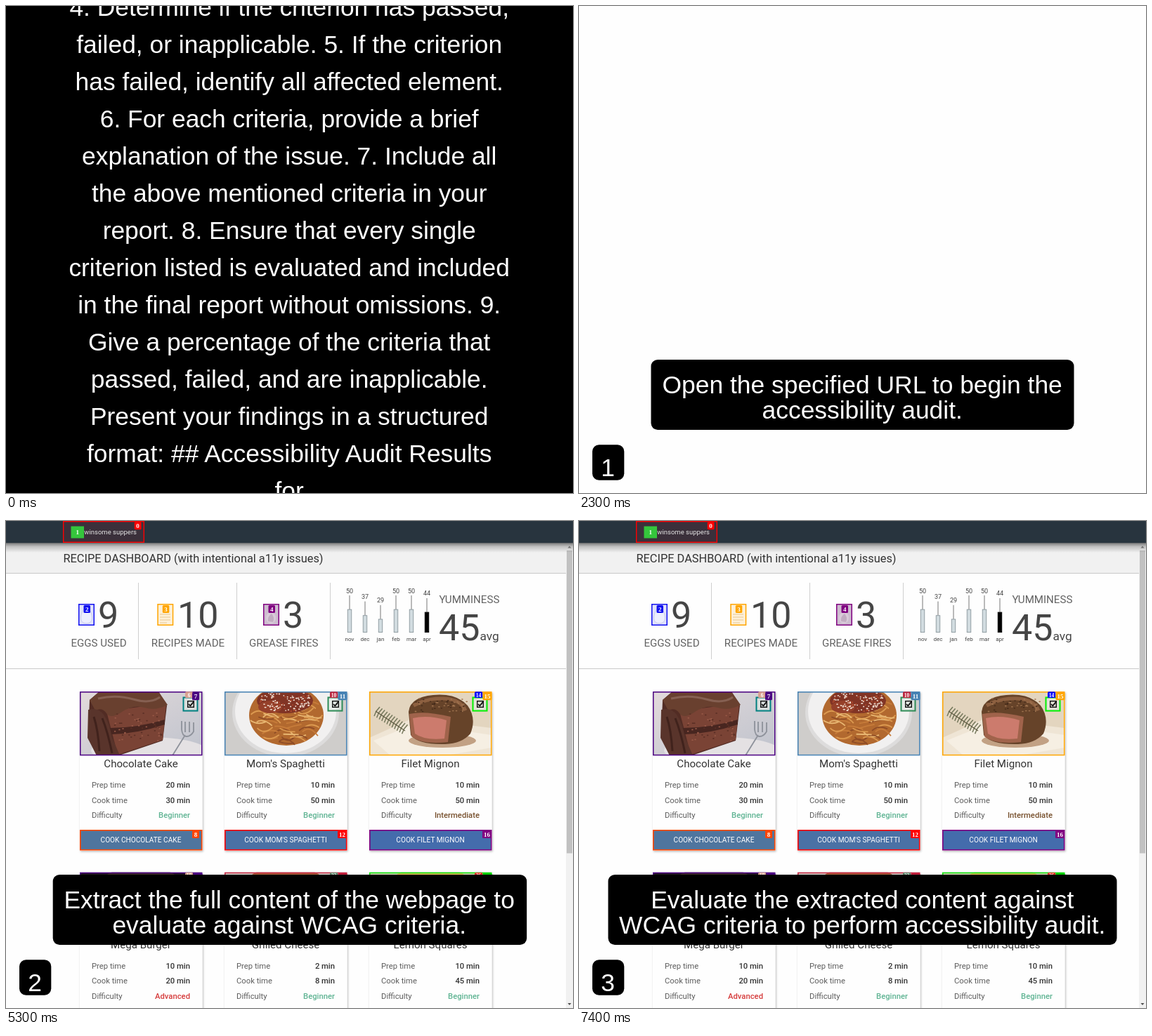
Write an HTML page that moves like this. It is 807 by 694 pixels and loops after 8 s.

```html
<!DOCTYPE html>
<html lang="en">
<head>
<meta charset="utf-8">
<title>Accessibility audit walkthrough</title>
<style>
html, body { margin: 0; width: 100%; height: 100%; overflow: hidden; background: #fefefe; }
svg { display: block; }
#stage { width: 807px; height: 694px; }
.scene { visibility: hidden; animation: 8s step-end infinite; }
#prompt { animation-name: prompt; }
#open { animation-name: open; }
#page { animation-name: page; }
#extract { animation-name: extract; }
#evaluate { animation-name: evaluate; }
@keyframes prompt { 0% { visibility: visible } 6.25%, 100% { visibility: hidden } }
@keyframes open { 0% { visibility: hidden } 6.25% { visibility: visible } 43.75%, 100% { visibility: hidden } }
@keyframes page { 0% { visibility: hidden } 43.75%, 100% { visibility: visible } }
@keyframes extract { 0% { visibility: hidden } 43.75% { visibility: visible } 81.25%, 100% { visibility: hidden } }
@keyframes evaluate { 0% { visibility: hidden } 81.25%, 100% { visibility: visible } }
.big { font: 35.4px "Liberation Sans", Arial, sans-serif; fill: #fff; text-anchor: middle; }
#page { font-family: Roboto, sans-serif; }
.tag { font-family: "Liberation Serif", serif; font-weight: 700; }
</style>
</head>
<body>
<svg id="stage" viewBox="0 0 807 694">
  <defs>
    <linearGradient id="shade" x2="0" y2="1">
      <stop offset="0" stop-opacity=".5"/>
      <stop offset=".4" stop-opacity=".2"/>
      <stop offset="1" stop-opacity="0"/>
    </linearGradient>
    <linearGradient id="mist" x2="1" y2="1">
      <stop offset="0" stop-color="#e3dadb"/>
      <stop offset="1" stop-color="#bfc3cd"/>
    </linearGradient>
    <filter id="lift" x="-10%" y="-10%" width="120%" height="120%">
      <feDropShadow dx="1" dy="1.5" stdDeviation="1.6" flood-opacity=".3"/>
    </filter>
  </defs>
  <g id="page" class="scene"></g>
  <g id="prompt" class="scene"></g>
  <g id="open" class="scene"></g>
  <g id="extract" class="scene"></g>
  <g id="evaluate" class="scene"></g>
</svg>
<script>
const put = (id, html) => { document.getElementById(id).innerHTML = html; };
const rect = (x, y, w, h, fill, more = '') =>
  `<rect x="${x}" y="${y}" width="${w}" height="${h}" fill="${fill}" ${more}/>`;
const text = (x, y, str, size, fill, more = '') =>
  `<text x="${x}" y="${y}" font-size="${size}" fill="${fill}" ${more}>${str}</text>`;
const path = (d, fill, more = '') => `<path d="${d}" fill="${fill}" ${more}/>`;
const oval = (x, y, rx, ry, fill, more = '') =>
  `<ellipse cx="${x}" cy="${y}" rx="${rx}" ry="${ry}" fill="${fill}" ${more}/>`;
const frame = (x, y, w, h, color, fill = 'none', sw = 1.5) =>
  rect(x + sw / 2, y + sw / 2, w - sw, h - sw, fill, `stroke="${color}" stroke-width="${sw}"`);
const MID = 'text-anchor="middle"', END = 'text-anchor="end"', MEDIUM = 'font-weight="500"';

const tag = (x, y, w, h, str, color) => rect(x, y, w, h, color, 'rx="1.5"') +
  text(x + w / 2, y + h / 2 + 3, str, Math.min(9, h - 1), '#fff', `class="tag" ${MID}`);

function random(seed) {
  return () => (seed = (seed * 16807) % 2147483647) / 2147483647;
}

// Prompt and captions
const bigLine = (y, str, x = 403.2) => `<text class="big" x="${x}" y="${y}">${str}</text>`;

const promptLines = [
  '4. Determine if the criterion has passed,',
  'failed, or inapplicable. 5. If the criterion',
  'has failed, identify all affected element.',
  '6. For each criteria, provide a brief',
  'explanation of the issue. 7. Include all',
  'the above mentioned criteria in your',
  'report. 8. Ensure that every single',
  'criterion listed is evaluated and included',
  'in the final report without omissions. 9.',
  'Give a percentage of the criteria that',
  'passed, failed, and are inapplicable.',
  'Present your findings in a structured',
  'format: ## Accessibility Audit Results',
  'for'
];
put('prompt', rect(0, 0, 807, 694, '#000') +
  promptLines.map((s, i) => bigLine(14 + i * 53, s)).join(''));

function caption(id, step, x, w, a, b) {
  put(id, rect(x, 504, w, 100, '#000', 'rx="9.5"') +
    bigLine(552.3, a) + bigLine(587.6, b) +
    rect(19, 625.3, 45.3, 50.5, '#000', 'rx="9.5"') + bigLine(670.3, step, 41.2));
}
caption('open', 1, 102.5, 602, 'Open the specified URL to begin the', 'accessibility audit.');
caption('extract', 2, 66.7, 674.5, 'Extract the full content of the webpage to', 'evaluate against WCAG criteria.');
caption('evaluate', 3, 41.5, 724, 'Evaluate the extracted content against', 'WCAG criteria to perform accessibility audit.');

// Dish pictures, each 174 by 91
function cake() {
  const r = random(11);
  let s = rect(0, 0, 174, 91, 'url(#mist)') +
    oval(98, 84, 82, 19, '#e4e1e3') +
    path('M14 12 28 0H112L124 20 118 70 56 91H24L12 66Z', '#522c24') +
    path('M38 28 123 17 118 69 54 90Z', '#7a4335') +
    path('M42 52Q82 52 121 40V47Q82 60 45 61Z', '#482620') +
    path('M14 12 28 0H112L125 19Q108 28 92 23T60 29 38 31 22 27Z', '#69402f') +
    path('M12 26Q26 22 34 33T46 66L57 91H24L11 66Z', '#59342b') +
    path('M20 36Q26 54 28 85M32 38Q40 58 46 88', 'none', 'stroke="#40221c" stroke-width="3"') +
    path('M26 10Q52 4 76 11T114 8', 'none', 'stroke="#866052" stroke-width="3"');
  for (let i = 0; i < 55; i++)
    s += oval(50 + r() * 66, 30 + r() * 40, 1.3, .9, i % 2 ? '#985a48' : '#5a2f25');
  return s + path('M132 91 150 62M145 42V54Q146 64 152 64T162 57V44M150 43V58M156 43V58',
    'none', 'stroke="#8e929b" stroke-width="1.8"');
}

function pasta() {
  const r = random(29);
  let s = rect(0, 0, 174, 91, '#cfcdcb') +
    oval(87, 30, 76, 63, '#dddcdc') + oval(87, 28, 72, 60, '#f1f0f0') +
    oval(88, 34, 53, 43, '#b2692f');
  for (let i = 0; i < 60; i++) {
    const a = r() * 6.28, d = Math.sqrt(r());
    const x = 88 + 44 * d * Math.cos(a), y = 36 + 36 * d * Math.sin(a);
    s += path(`M${x - 10} ${y}q10 ${r() * 24 - 12} 22 ${r() * 12 - 6}`, 'none',
      `stroke="${['#dc9a50', '#c77c3a', '#e8b671', '#8f4c26'][i % 4]}" stroke-width="1.8"`);
  }
  s += oval(86, 13, 40, 18, '#813425') + oval(65, 22, 17, 9, '#96402a');
  for (let i = 0; i < 130; i++) {
    const a = r() * 6.28, d = Math.sqrt(r());
    s += oval(86 + 39 * d * Math.cos(a), 12 + 17 * d * Math.sin(a), .8 + r(), .9,
      i % 4 ? '#f0ddd0' : '#b24a2e');
  }
  return s;
}

function steak() {
  const r = random(7);
  let s = rect(0, 0, 174, 91, '#e3d5bf') +
    path('M0 66 62 38 174 52V91H0Z', '#efe5d5') +
    path('M6 70 65 46 174 62V80L110 91H30Z', '#f6efe3') +
    oval(104, 70, 48, 10, '#c2a184') +
    path('M56 29Q58 8 91 5T140 20Q153 38 144 60 132 74 108 75 70 76 59 62Z', '#664329') +
    path('M57 32Q78 27 116 36L112 72Q75 76 60 64Z', '#a0634b') +
    path('M62 38Q84 33 110 41L107 67Q79 70 65 60Z', '#cc7b6d') +
    path('M63 20Q82 9 106 10T137 27', 'none', 'stroke="#8d6040" stroke-width="5"');
  for (let i = 0; i < 55; i++)
    s += oval(66 + r() * 73, 10 + r() * 20, 1.4, .8, i % 2 ? '#452b1a' : '#a07450');
  for (let i = 0; i < 12; i++) {
    const x = 10 + i * 3.6, y = 28 + i * 2.3;
    s += path(`M${x} ${y}l5-6M${x} ${y}l-3 7`, 'none', 'stroke="#75785c" stroke-width="1.5"');
  }
  return s + path('M9 28 51 56', 'none', 'stroke="#5d583f" stroke-width="1.2"');
}

const plain = (base, blot) => () => rect(0, 0, 174, 91, base) + oval(87, 14, 55, 22, blot);

// Dashboard
function stat(x, icon, color, fill, num, value, numX, label, mid) {
  return frame(x, 118, 23, 31, color, fill) + icon +
    tag(x + 7.5, 120, 9.5, 11, num, color) +
    text(numX, 151.5, value, 52, '#454545') + text(mid, 179.4, label, 15.1, '#636363', MID);
}

function chart() {
  const values = [50, 37, 29, 50, 50, 44];
  return ['nov', 'dec', 'jan', 'feb', 'mar', 'apr'].map((month, i) => {
    const v = values[i], x = 489 + i * 22, top = 159 - v * .66;
    const [fill, edge] = i === 5 ? ['#000', '#000'] : ['#d2dce0', '#89969c'];
    return text(x, 102.6 + (50 - v) * .64, v, 9, '#444', MID) +
      rect(x - .5, top - 20, 1, 20, '#777') +
      frame(x - 3.2, top - .3, 6.4, 159.3 - top, edge, fill, .9) +
      text(x, 171, month, 8.1, '#444', MID);
  }).join('');
}

const levels = { Beginner: '#5fb493', Intermediate: '#77502d', Advanced: '#d53a3a' };

function card(i, c) {
  const x = 105 + (i % 3) * 206, y = i < 3 ? 243 : 500.7;
  const row = (n, label, value, color = '#333') =>
    text(x + 17, y + 137 + n * 21.5, label, 11.25, '#5d5d5d') +
    text(x + 157, y + 137 + n * 21.5, value, 11.25, color, `${MEDIUM} ${END}`);
  const [a, b] = c.tags;
  return rect(x, y, 174.5, 226.5, '#fefefe', 'filter="url(#lift)"') +
    `<svg x="${x}" y="${y}" width="174.5" height="91">${c.art()}</svg>` +
    frame(x, y, 174.5, 91.3, c.edge) +
    frame(x + 146.5, y + 7.5, 22, 21, c.check, 'rgba(225,235,228,.6)', 2) +
    frame(x + 153, y + 13, 10, 10, '#111', 'none', 1.4) +
    path(`M${x + 155} ${y + 18}l2.3 2.4 5-6`, 'none', 'stroke="#111" stroke-width="1.8"') +
    tag(x + 150, y + .3, 11.2, 8.6, a[0], a[1]) +
    tag(x + (b[0] < 10 ? 160 : 161.5), y + 1, b[0] < 10 ? 10 : 13, 11.3, b[0], b[1]) +
    text(x + 87, y + 108.3, c.name, 15.1, '#333', MID) +
    row(0, 'Prep time', c.prep + ' min') + row(1, 'Cook time', c.cook + ' min') +
    row(2, 'Difficulty', c.level, levels[c.level]) +
    frame(x, y + 197, 174.5, 29.5, c.hot, c.fill, 1.6) +
    text(x + 87, y + 215.2, 'COOK ' + c.name.toUpperCase(), 10.15, '#fff', MID) +
    tag(x + (c.id < 10 ? 160 : 161), y + 198, c.id < 10 ? 10 : 13, 11, c.id, c.hot);
}

const cards = [
  { name: 'Chocolate Cake', prep: 20, cook: 30, level: 'Beginner', art: cake, edge: '#4b0082', check: '#008080',
    tags: [[6, '#d9a08f'], [7, '#4b0082']], id: 8, hot: '#ff4500', fill: '#4f759e' },
  { name: "Mom's Spaghetti", prep: 10, cook: 50, level: 'Beginner', art: pasta, edge: '#4682b4', check: '#2e8b57',
    tags: [[10, '#bd2840'], [11, '#4682b4']], id: 12, hot: '#ff0000', fill: '#4a71a5' },
  { name: 'Filet Mignon', prep: 10, cook: 50, level: 'Intermediate', art: steak, edge: '#ffa500', check: '#00f000',
    tags: [[14, '#0000ff'], [15, '#ffa500']], id: 16, hot: '#800080', fill: '#446cac' },
  { name: 'Mega Burger', prep: 10, cook: 20, level: 'Advanced', art: plain('#21171f', '#3c2925'), edge: '#4b0082', check: '#008080',
    tags: [[18, '#d9a08f'], [19, '#4b0082']], id: 20, hot: '#ff4500', fill: '#4f759e' },
  { name: 'Grilled Cheese', prep: 2, cook: 8, level: 'Beginner', art: plain('#d3cbc4', '#a65c38'), edge: '#c01f3c', check: '#2e8b57',
    tags: [[22, '#598366'], [23, '#c01f3c']], id: 24, hot: '#ff0000', fill: '#4a71a5' },
  { name: 'Lemon Squares', prep: 10, cook: 45, level: 'Beginner', art: plain('#d0d3b0', '#dfbf57'), edge: '#00e000', check: '#00f000',
    tags: [[26, '#e02a20'], [27, '#00c800']], id: 28, hot: '#800080', fill: '#446cac' }
];

const eggIcon = path('M114.5 124c-5 0-8 9-8 14s3 8 8 8 8-3 8-8-3-14-8-14Z', '#eceefe', 'stroke="#c6c9ee"');
const noteIcon = path('M219 133h15M219 137h15M219 141h15M219 145h10', 'none', 'stroke="#e8c894"');
const fireIcon = oval(377, 138, 7, 8, '#d9cbd9') + path('M373 143q-1-7 5-11 5 6 2 12', '#c2adc2');

put('page',
  rect(0, 0, 807, 694, '#fefefe') +
  rect(0, 31, 797, 43.5, '#f1f1f1') + rect(0, 74, 797, 1, '#c9c9c9') +
  rect(0, 210, 797, 1, '#c9c9c9') +
  [188, 328, 461].map(x => rect(x, 88, 1, 109, '#cfcfcf')).join('') +
  text(81.5, 59, 'RECIPE DASHBOARD (with intentional a11y issues)', 16.35, '#333') +
  stat(103, eggIcon, '#1010f0', '#e0e2fa', 2, 9, 131, 'EGGS USED', 132) +
  stat(215.3, noteIcon, '#ffa500', '#fdf0d8', 3, 10, 244, 'RECIPES MADE', 259) +
  stat(366, fireIcon, '#800080', '#cdbccf', 4, 3, 394, 'GREASE FIRES', 395.2) +
  chart() +
  text(616.5, 116.8, 'YUMMINESS', 15.1, '#636363') +
  text(616, 170, '45', 52, '#454545') + text(674.5, 170, 'avg', 17.3, '#454545') +
  cards.map((c, i) => card(i, c)).join('') +
  rect(797, 31, 10, 663, '#f1f1f1') + rect(798, 42, 8, 431.5, '#c1c1c1') +
  path('M799.5 38.5h5l-2.5-3Z', '#8a8a8a') + path('M799.5 687h5l-2.5 3Z', '#505050') +
  rect(0, 31, 807, 14, 'url(#shade)') +
  rect(0, 0, 807, 31.3, '#28343e') +
  frame(81, 0, 116, 31, '#f00', '#3b303b', 1.4) +
  rect(92.5, 7.5, 18.5, 17, '#35c53c') + text(101.8, 19, '1', 9, '#fff', `class="tag" ${MID}`) +
  text(111.3, 19, 'winsome suppers', 9.5, '#e2e2e2') +
  tag(182.7, 1.2, 9.8, 11, 0, '#ff0000'));
</script>
</body>
</html>
```
